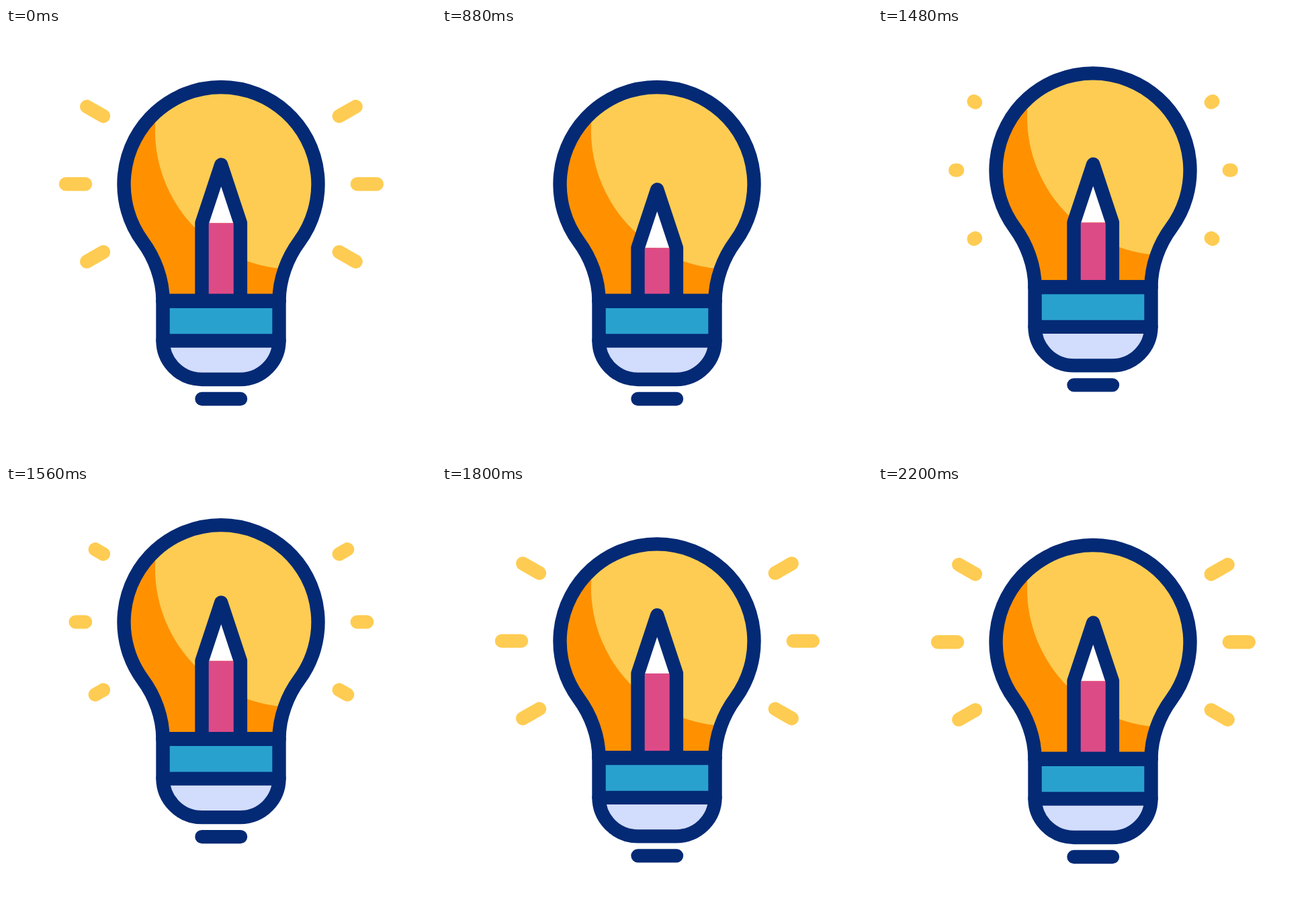
Animation of 640x640 px, one loop 2280 ms. Source, as an HTML page:

```html
<!DOCTYPE html>
<html lang="en">
<head>
<meta charset="utf-8">
<title>Idea bulb</title>
<style>
  html, body { margin: 0; width: 100%; height: 100%; overflow: hidden; background: #fff; }
  svg { display: block; width: 100%; height: 100%; }
  .ink { fill: none; stroke: #042a75; stroke-width: 20.4; stroke-linecap: round; stroke-linejoin: round; }
  #rays { stroke: #fecc52; stroke-width: 20.4; stroke-linecap: round; }
</style>
</head>
<body>
<svg viewBox="0 0 640 640">
  <defs>
    <path id="glass" d="M233.5 406C233.5 374 221.3 342 203.5 318A144.5 144.5 0 1 1 436.5 318C418.7 342 406.5 374 406.5 406Z"/>
    <path id="cap" d="M233.5 406V465A58 58 0 0 0 291.5 523H348.5A58 58 0 0 0 406.5 465V406Z"/>
    <clipPath id="inside"><use href="#glass"/></clipPath>
    <clipPath id="aboveCap"><path d="M0 0H640V407H0Z"/></clipPath>
  </defs>
  <g id="bulb">
    <g id="rays"></g>
    <g clip-path="url(#inside)">
      <path fill="#ff9100" d="M160 70H480V420H160Z"/>
      <circle cx="428.3" cy="152.5" r="206.4" fill="#fecc52"/>
    </g>
    <g clip-path="url(#aboveCap)">
      <g id="pencil">
        <path fill="#fff" d="M291.5 290.3L320.2 203.5L348.9 290.3Z"/>
        <path fill="#dd4b87" d="M291.5 290.3H348.9V440H291.5Z"/>
        <path class="ink" d="M291.5 440V290.3L320.2 203.5L348.9 290.3V440"/>
      </g>
    </g>
    <use href="#cap" fill="#d2dcfd"/>
    <path fill="#29a1cf" d="M233.5 407H406.5V465.5H233.5Z"/>
    <use href="#glass" class="ink"/>
    <use href="#cap" class="ink"/>
    <path class="ink" d="M233.5 406.8H406.5M233.5 465.5H406.5M291.5 552H349"/>
  </g>
</svg>
<script>
const LOOP = 2280, STEP = 40;

// [time in ms, value], eased between neighbours
const tracks = {
  bulb: [[1333, 0], [1567, -30], [1867, 2.5], [2200, 0]],
  pencil: [[160, 0], [880, 37], [1365, 37], [1660, -13.7], [2050, 0]],
  rayIn: [[455, 0], [715, 1]],
  rayOut: [[1430, 0], [1692, 1]]
};

const ease = p => p * p * (3 - 2 * p);
const mix = (a, b, p) => a + (b - a) * p;

function valueAt(keys, t) {
  if (t <= keys[0][0]) return keys[0][1];
  for (let i = 1; i < keys.length; i++) {
    const [t0, a] = keys[i - 1], [t1, b] = keys[i];
    if (t < t1) return mix(a, b, ease((t - t0) / (t1 - t0)));
  }
  return keys[keys.length - 1][1];
}

const $ = id => document.getElementById(id);
const shift = (el, y) => el.setAttribute('transform', `translate(0 ${y.toFixed(2)})`);

// inner x, y and outer x, y of the left rays; the right ones mirror them
const left = [[145, 131.2, 120.2, 117], [118, 232.3, 89, 232.3], [145, 333.4, 120.2, 347.6]];
const rays = [...left, ...left.map(([a, b, c, d]) => [640.8 - a, b, 640.8 - c, d])].map(pos => {
  const el = document.createElementNS('http://www.w3.org/2000/svg', 'line');
  $('rays').append(el);
  return { el, pos };
});

function drawRays(from, to) {
  $('rays').style.display = to - from > 0.001 ? '' : 'none';
  for (const { el, pos: [x0, y0, x1, y1] } of rays) {
    el.setAttribute('x1', mix(x0, x1, from));
    el.setAttribute('y1', mix(y0, y1, from));
    el.setAttribute('x2', mix(x0, x1, to));
    el.setAttribute('y2', mix(y0, y1, to));
  }
}

function draw(now) {
  const t = Math.floor((now % LOOP) / STEP) * STEP;
  shift($('bulb'), valueAt(tracks.bulb, t));
  shift($('pencil'), valueAt(tracks.pencil, t));
  if (t < 1100) drawRays(valueAt(tracks.rayIn, t), 1);
  else drawRays(0, valueAt(tracks.rayOut, t));
}

function tick(now) {
  draw(now);
  requestAnimationFrame(tick);
}
draw(0);
requestAnimationFrame(tick);
</script>
</body>
</html>
```
